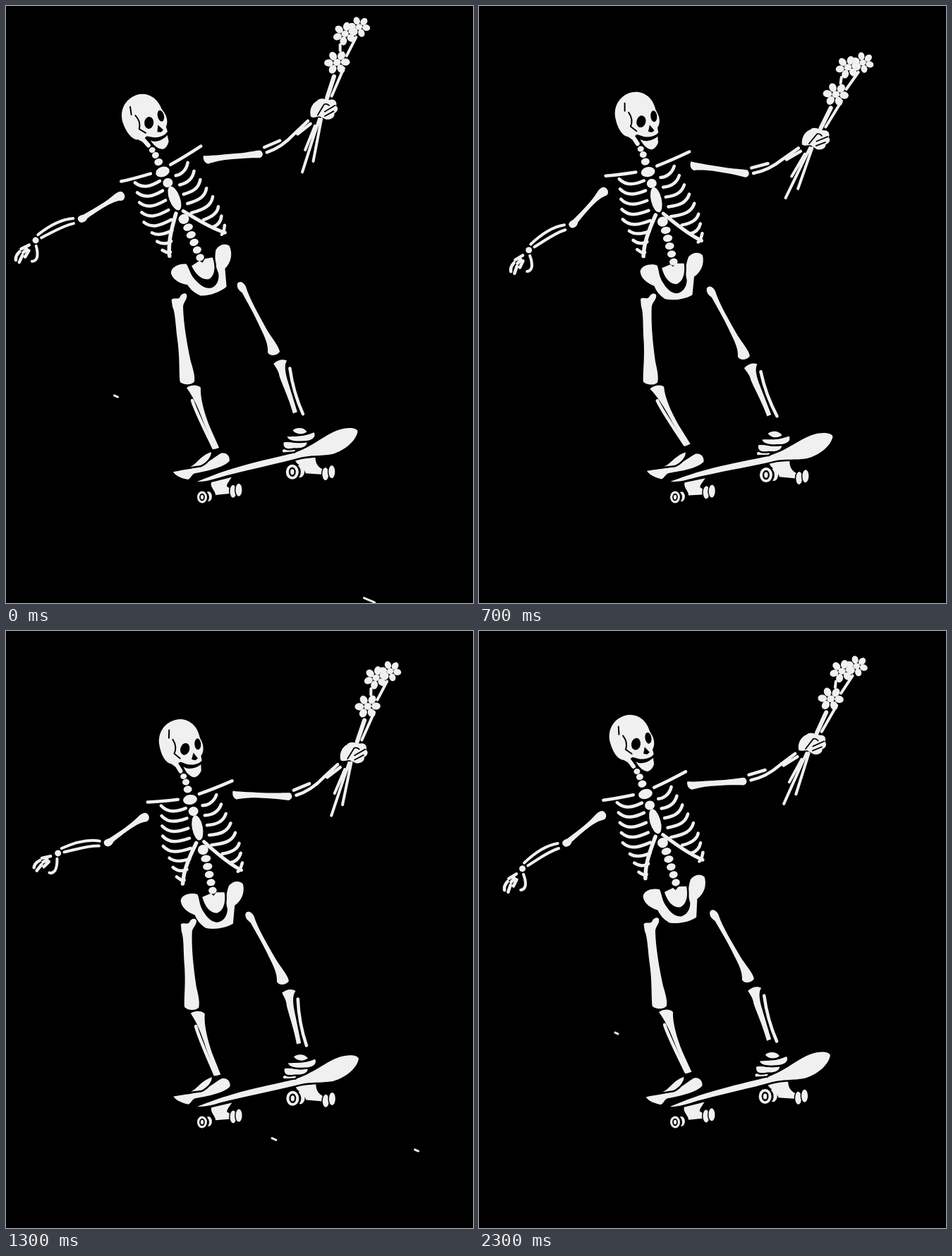
Recreate the animation shown at these times as an HTML page with a canvas. Size 662 by 846 pixels, loop 2.4 s.

```html
<!DOCTYPE html>
<html lang="en">
<head>
<meta charset="utf-8">
<title>Skating skeleton</title>
<style>
html, body { margin: 0; width: 100%; height: 100%; overflow: hidden; background: #000; }
canvas { display: block; }
</style>
</head>
<body>
<canvas id="stage" width="662" height="846"></canvas>
<script>
const ctx = document.getElementById('stage').getContext('2d');
const BONE = '#f0f0f0', RAD = Math.PI / 180;

// Drawing helpers; every part is drawn in the coordinates of the rest pose
function fill(d, color = BONE) {
  ctx.fillStyle = color;
  ctx.fill(new Path2D(d));
}
function line(d, width = 4.5, color = BONE) {
  ctx.strokeStyle = color;
  ctx.lineWidth = width;
  ctx.stroke(new Path2D(d));
}
function oval(x, y, rx, ry = rx, turn = 0, color = BONE) {
  ctx.fillStyle = color;
  ctx.beginPath();
  ctx.ellipse(x, y, rx, ry, turn * RAD, 0, 7);
  ctx.fill();
}
function edged(d) {
  line(d, 5, '#000');
  fill(d);
}
function place(draw, rest, at, angle) {
  ctx.save();
  ctx.translate(...at);
  ctx.rotate(angle * RAD);
  ctx.translate(-rest[0], -rest[1]);
  draw();
  ctx.restore();
}
function turned([x, y], [ox, oy], angle) {
  const c = Math.cos(angle * RAD), s = Math.sin(angle * RAD);
  return [ox + x * c - y * s, oy + x * s + y * c];
}
const heading = (a, b) => Math.atan2(b[1] - a[1], b[0] - a[0]) / RAD;

function skull() {
  fill('M277 125C293 124 305 137 306 152C306 157 309 161 309 167C309 174 307 178 304 181L304 188C298 193 289 192 283 190L274 185C270 186 268 188 266 191L261 186C252 183 248 170 248 155C249 137 262 126 277 125Z');
  fill('M277 192C281 198 294 198 302 193L301 202C297 208 292 211 288 209C283 206 279 201 277 192Z');
  line('M267 186L272 198', 6);
  oval(283, 168, 6.5, 8.5, 25, '#000');
  oval(302, 164, 4.5, 8, 5, '#000');
  fill('M294 175L299 184L295 186L290 184Z', '#000');
  line('M265 138L263 149M268 152Q273 163 267 172L274 180', 2, '#000');
}

function spine() {
  oval(275, 206, 4.5, 4);
  oval(277, 214.5, 5, 4.5);
  oval(278, 225, 6, 5);
  oval(279, 240, 10, 7);
  oval(281, 257, 7, 6.5);
  oval(283, 281, 7.5, 18, -2);
  oval(286, 313, 7.5, 7);
  for (let i = 0; i < 5; i++) oval(288 + i * .6, 326 + i * 11.5, 7 - i * .3, 5);
}

function ribs() {
  line('M219 234Q235 236 262 237M293 234Q315 230 342 223');
  for (let i = 0; i < 5; i++) {
    const y = 242 + i * 14.3, l = 237 - i * 1.5, r = 317 + i * 4.5;
    line(`M${l} ${y}C${l + 8} ${y + 12} ${l + 20} ${y + 12} ${271 - i * .5} ${y + 9}`);
    line(`M${r} ${y - 3}C${r - 6} ${y + 8} ${r - 16} ${y + 10} ${295 + i} ${y + 9}`);
  }
  for (let i = 0; i < 3; i++) {
    const y = 317 + i * 14, l = 237 + i * 3, r = 338;
    line(`M${l} ${y}Q${l + 8} ${y + 9} ${265 - i * 6} ${y + 6}`);
    line(`M${r} ${y - 5}Q${r - 5} ${y + 6} ${312 + i * 9} ${y + 6}`);
  }
  line('M278 302C264 322 254 338 250 356', 5.5);
  line('M289 302C300 315 315 335 335 350', 5);
}

function torso() { skull(); spine(); ribs(); }

function pelvis() {
  fill('M244 378C248 369 262 370 269 374C271 382 268 390 274 402C278 412 284 417 290 418C298 418 305 412 307 402C306 390 310 378 315 370C322 364 331 365 335 371C336 382 330 394 318 399L311 424C300 428 284 428 272 423C264 415 262 410 260 402C250 396 243 388 244 378Z');
  edged('M275 379L288 376L291 380L296 376L307 378C307 390 302 404 291 405C281 403 276 392 275 379Z');
}

function leftUpperArm() {
  fill('M203 254C207 250 213 247 216 251C220 255 218 262 212 262C200 264 182 278 167 290C165 296 157 299 154 293C152 288 157 286 161 285C178 274 192 265 203 254Z');
}
function leftForearm() {
  line('M147 291C128 293 112 304 98 316M148 298C132 302 120 311 103 320', 4);
  oval(95, 324, 4.5);
  line('M86 331L75 337M73 341Q67 347 68 353M83 337L78 342M77 346L73 356M86 339L81 348');
  line('M96 332Q99 341 98 348Q96 354 91 354', 4);
}

function rightUpperArm() {
  fill('M341 237C352 241 372 245 388 249C400 252 412 253 420 255C424 260 421 265 416 265C404 261 390 257 376 254C364 251 352 250 344 250C339 247 339 241 341 237Z');
}
function flower(x, y, r, petals, turn) {
  for (let i = 0; i < petals; i++) {
    const a = i / petals * 360 + turn;
    oval(x + r * Math.cos(a * RAD), y + r * .88 * Math.sin(a * RAD), r * .53, r * .43, a);
  }
  oval(x, y, r * .45, r * .4);
}
function rightForearm() {
  line('M427 253L451 252M428 261C445 262 462 256 474 250L498 240M478 252L500 245');
  line('M514 243L465 305M517 244L485 296M505 250L480 277', 4);
  line('M535 219L555 194', 6);
  line('M542 219L572 188M582 173L604 153M576 163L579 155', 4);
  flower(566, 177, 12, 6, 20);
  flower(591, 143, 11.5, 6, 0);
  flower(613, 141, 10.5, 6, 30);
  fill('M504 236C505 226 512 219 520 218C526 214 532 220 538 223C546 224 546 231 543 234C546 239 541 243 537 243C536 249 528 250 523 247L516 240C512 238 508 240 504 236Z');
  line('M514 237L528 226Q532 226 534 230M525 236L542 233M523 242L537 240', 1.8, '#000');
}

function leftThigh() {
  fill('M242 418C246 414 251 419 254 415C256 410 262 408 264 412C265 418 259 422 258 428C257 455 262 490 265 508C268 520 270 530 268 536C262 541 252 539 248 535C247 520 250 500 247 470C246 450 246 435 243 428Z');
}
function leftShin() {
  fill('M257 544C264 539 274 540 277 544C276 558 282 580 290 600L303 629L297 631L283 598C276 580 270 562 257 544Z');
  line('M265 562C270 578 285 608 295 629');
}
function rightThigh() {
  fill('M333 404C336 399 342 402 345 408C350 425 365 450 375 468C382 480 393 492 394 500C390 506 380 507 377 501C378 490 372 478 366 466C357 446 347 430 340 417C335 413 332 410 333 404Z');
}
function rightShin() {
  fill('M385 517C391 511 399 510 404 513C400 519 401 528 404 540L417 586L411 588C405 565 396 545 393 535C392 527 388 522 385 517Z');
  line('M408 524C411 550 417 570 425 589');
}

function wheel(x, y, r) {
  oval(x + r + 2, y - 1, r * .7, r);
  oval(x, y, r + 3, r + 3, 0, '#000');
  oval(x, y, r, r + 1.5);
  oval(x, y, r * .55, r * .75, 0, '#000');
  oval(x, y, r * .3, r * .45);
}
function board() {
  fill('M290 674L319 667C316 672 312 676 312 680L320 685L318 690L296 692C296 686 288 681 290 674Z');
  fill('M409 641L438 636C437 646 440 654 452 658L450 664L424 662C422 652 408 649 409 641Z');
  wheel(277, 695, 7);
  wheel(405, 660, 9);
  for (const [x, y] of [[321, 687], [329, 685], [452, 663], [461, 660]]) {
    oval(x, y, 6, 10.5, 0, '#000');
    oval(x, y, 4.5, 9);
  }
  edged('M270 673C285 667 300 661 320 655C350 646 375 641 400 635C430 628 450 608 470 601C485 596 497 598 498 603C496 616 480 630 462 635C445 638 430 636 415 640C385 648 350 655 318 663C300 667 285 674 270 673Z');
  edged('M236 659C245 657 262 655 268 653C285 648 292 640 304 633C312 631 317 637 316 644C308 653 285 658 268 661C262 662 262 668 257 670C248 668 240 665 236 659Z');
  edged('M260 652C270 648 274 637 290 631C291 637 284 646 275 650Z');
  edged('M391 629C397 625 404 626 411 627L408 631L392 632Z');
  edged('M393 618C405 616 415 622 426 617C427 624 418 627 408 626C398 628 392 627 393 618Z');
  edged('M398 610C408 609 420 611 436 604C440 611 432 616 422 616C410 617 400 616 398 610Z');
  edged('M406 601C412 596 422 597 426 603C420 608 410 607 406 601Z');
}

// torso x y turn, pelvis x y turn, arm turns (left upper, left fore, right upper, right fore),
// left knee x y, right knee x y, board turn
const KEYS = [0, 4, 9, 13, 17, 20, 23], FRAMES = 24;
const POSES = [
  [222, 235, -18.7, 282, 373, -20.5, 3.5, 2.2, -18.4, -20.7, 262, 537, 382, 497, -.3],
  [244, 228, -18.2, 297, 369, -13, -4.4, 10.3, -2.8, -26.1, 261, 534, 396, 504, 7.2],
  [238, 240, -6.8, 267, 386, -9, -14.7, -8.5, -6.8, -5.4, 243, 540, 369, 502, -2.1],
  [261, 239, -9, 296, 385, -10.5, -.5, 16.1, -10.8, -19.9, 268, 538, 395, 503, .6],
  [279, 240, 0, 291, 390, 0, 0, 0, 0, 0, 263, 540, 388, 507, 0],
  [275, 236, -1.3, 289, 384, -1.5, -11.2, -13.9, 1.2, 6.5, 262, 536, 391, 506, .9],
  [236, 231, -14, 281, 377, -13, -3.8, -3.1, -16.8, -14.2, 261, 536, 384, 500, -.7]
];
// frame, x, y, length
const STREAKS = [
  [0, 156, 553, 5], [0, 515, 842, 15], [4, 137, 584, 12], [4, 362, 745, 13],
  [9, 183, 638, 13], [9, 561, 690, 27], [9, 543, 802, 5], [13, 380, 720, 6],
  [13, 582, 736, 5], [17, 227, 569, 27], [17, 236, 642, 5], [17, 558, 792, 12],
  [20, 131, 588, 6], [20, 435, 730, 12], [23, 195, 570, 4]
];

// Smooth cyclic curve through the key poses
function poseAt(frame) {
  const n = KEYS.length;
  const time = k => KEYS[(k + n) % n] + Math.floor(k / n) * FRAMES;
  const pose = k => POSES[(k + n) % n];
  const k = KEYS.findLastIndex(t => t <= frame);
  const span = time(k + 1) - time(k), u = (frame - time(k)) / span;
  return pose(k).map((a, j) => {
    const slope = i => (pose(i + 1)[j] - pose(i - 1)[j]) / (time(i + 1) - time(i - 1)) * span;
    const b = pose(k + 1)[j], m = slope(k), w = slope(k + 1);
    return a + u * (m + u * (3 * (b - a) - 2 * m - w + u * (2 * (a - b) + m + w)));
  });
}

function leg(thigh, shin, rest, hip, knee, ankle) {
  place(shin, rest[1], knee, heading(knee, ankle) - heading(rest[1], rest[2]));
  place(thigh, rest[1], knee, heading(hip, knee) - heading(rest[0], rest[1]));
}

function render(frame) {
  const [tx, ty, ta, px, py, pa, lu, lf, ru, rf, klx, kly, krx, kry, ba] = poseAt(frame);
  ctx.fillStyle = '#000';
  ctx.fillRect(0, 0, 662, 846);
  ctx.lineCap = ctx.lineJoin = 'round';

  for (const [t, x, y, len] of STREAKS) {
    const d = frame - t;
    if (Math.abs(d) > 1) continue;
    const h = len * (1 - Math.abs(d) / 2) / 2, cx = x + d * 12, cy = y + d * 5;
    line(`M${cx - h} ${cy - h * .42}L${cx + h} ${cy + h * .42}`, 3);
  }

  const truck = [278, 695];
  place(board, [277, 694], truck, ba);
  leg(leftThigh, leftShin, [[253, 418], [263, 540], [299, 634]],
    [px - 37, py + 27.6 - pa * .55], [klx, kly], turned([22, -60], truck, ba));
  leg(rightThigh, rightShin, [[340, 404], [388, 507], [420, 592]],
    [px + 50, py + 14], [krx, kry], turned([143, -102], truck, ba));
  place(pelvis, [291, 390], [px, py], pa);
  place(torso, [279, 240], [tx, ty], ta);

  const ls = turned([-62, 13], [tx, ty], ta), rs = turned([64, 2], [tx, ty], ta);
  place(leftUpperArm, [217, 253], ls, lu);
  place(leftForearm, [156, 292], turned([-61, 39], ls, lu), lf);
  place(rightUpperArm, [343, 242], rs, ru);
  place(rightForearm, [422, 260], turned([79, 18], rs, ru), rf);
}

let start, last;
function tick() {
  const now = performance.now();
  start ??= now;
  const frame = Math.floor((now - start) / 100) % FRAMES;
  if (frame !== last) render(last = frame);
  requestAnimationFrame(tick);
}
tick();
</script>
</body>
</html>
```
